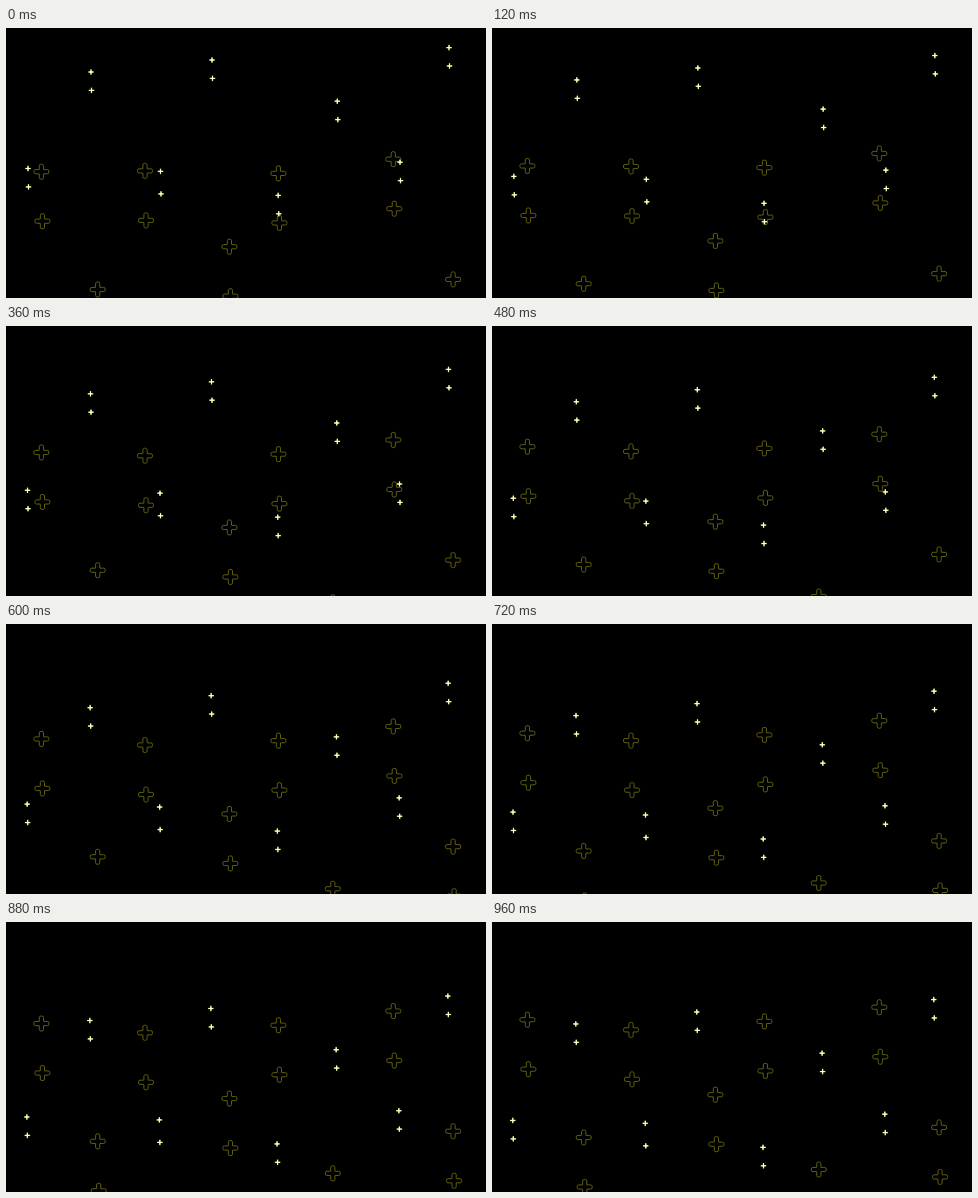
Animation of 480 by 270 pixels, one loop 1000 ms. Source, as an HTML page with a canvas:

```html
<!DOCTYPE html>
<html lang="en">
<head>
<meta charset="utf-8">
<title>Drifting pluses</title>
<style>
html, body { margin: 0; width: 100%; height: 100%; overflow: hidden; background: #000; }
canvas { display: block; }
</style>
</head>
<body>
<canvas id="stage" width="480" height="270"></canvas>
<script>
const ctx = document.getElementById('stage').getContext('2d');
const LOOP = 1000, STEP = 40;
const SPARK_GAP = 18.4, RING_GAP = 49.5, RISE = .0479;

// Start of each falling pair: x, y and, if wider, the gap
const sparks = [
  [22, 140.5], [85, 44], [154.5, 143.4, 22.5], [206, 32],
  [272.2, 167.4], [331.3, 73.2], [394, 134.2], [443, 19.6]
];

// Start of each rising pair: x, y and, if slower, the speed
const rings = [
  [35.4, 143.7], [139, 142.9, .0365], [272.4, 145.4], [387.3, 131.2],
  [91.7, 261.5], [223.4, 218.7], [326.8, 293.5], [447.1, 251.4]
];

// Outline of a plus: each arm end has two rounded corners, then an inner corner
function plusPath(reach, half, round) {
  const path = new Path2D();
  const arm = [[reach, -half], [reach, half], [half, half]];
  const turn = ([x, y]) => [-y, x];
  const pts = [];
  for (let q = 0, part = arm; q < 4; q++, part = part.map(turn)) pts.push(...part);
  path.moveTo((reach + half) / 2, -half);
  pts.forEach(([x, y], i) => {
    const next = pts[(i + 1) % pts.length];
    path.arcTo(x, y, ...next, i % 3 < 2 ? round : .2);
  });
  path.closePath();
  return path;
}

const ringPath = plusPath(7.5, 2.1, 1.6);

function ring(x, y) {
  ctx.save();
  ctx.translate(x, y);
  ctx.strokeStyle = '#6c6a10';
  ctx.lineWidth = .9;
  ctx.stroke(ringPath);
  ctx.restore();
}

function cross(x, y, reach, width, color) {
  ctx.fillStyle = color;
  ctx.fillRect(x - reach, y - width / 2, reach * 2, width);
  ctx.fillRect(x - width / 2, y - reach, width, reach * 2);
}

function spark(x, y) {
  cross(x, y, 2.8, 1.3, '#dcdc48');
  cross(x, y, 2.2, 1, '#ffffe0');
}

// Steady fall that slows near the end of the loop
function fall(t) {
  const knee = 720;
  return Math.min(t, knee) * .0661 + Math.max(0, t - knee) * .0432;
}

function draw(t) {
  ctx.fillStyle = '#000';
  ctx.fillRect(0, 0, 480, 270);

  for (const [x, y, speed = RISE] of rings) {
    const top = y - t * speed;
    ring(x, top);
    ring(x + 1, top + RING_GAP);
  }

  const drop = fall(t), drift = -drop * .021;
  for (const [x, y, gap = SPARK_GAP] of sparks) {
    spark(x + drift, y + drop);
    spark(x + drift + .5, y + drop + gap);
  }
}

const start = performance.now();
function tick() {
  const t = (performance.now() - start) % LOOP;
  draw(Math.floor(t / STEP) * STEP);
  requestAnimationFrame(tick);
}
tick();
</script>
</body>
</html>
```
